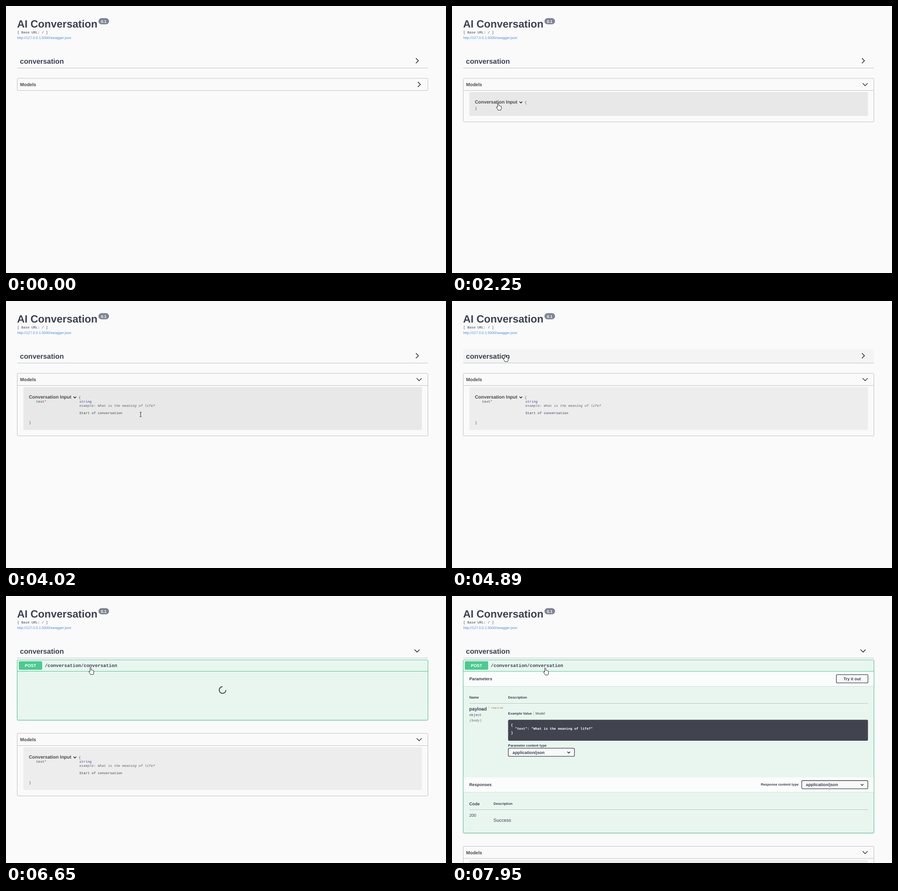
These frames come from a looping animation (961x583 px, 8 s). An HTML page:

```html
<!DOCTYPE html>
<html lang="en">
<head>
<meta charset="utf-8">
<title>API page</title>
<style>
html, body { margin: 0; width: 100%; height: 100%; overflow: hidden; background: #fafafa; }
svg { display: block; width: 961px; height: 583px; }
text { font-family: "Liberation Sans", Arial, sans-serif; fill: #3b4151; text-rendering: geometricPrecision; }
.b { font-weight: 700; }
.m { font-family: "Liberation Mono", "Courier New", monospace; }
.i { font-style: italic; fill: #666; }
.w { fill: #fff; }
.d { fill: #484a4d; }
.line { fill: none; stroke: #bfc1c5; }
.green { fill: none; stroke: #49cc90; }
.chev { fill: none; stroke: #111; stroke-width: 1.3; }
.box { fill: #f8f9f9; stroke: #41444e; stroke-width: 1.3; }
</style>
</head>
<body>
<svg id="stage" viewBox="0 0 961 583"></svg>
<script>
const $ = id => document.getElementById(id);
const text = (x, y, size, str, cls = '') =>
  `<text x="${x}" y="${y}" font-size="${size}" class="${cls}">${str}</text>`;
const mono = (x, y, str, cls = '') => text(x, y, 7.45, str, 'm ' + cls);
const rect = (x, y, w, h, attrs) => `<rect x="${x}" y="${y}" width="${w}" height="${h}" ${attrs}/>`;
const path = (d, cls, id = '') => `<path d="${d}" class="${cls}" id="${id}"/>`;
const group = (id, body) => `<g id="${id}">${body}</g>`;
const select = (x, y) => rect(x, y, 144.5, 17.8, 'rx="2.5" class="box"') +
  text(x + 9.3, y + 12.1, 9.2, 'application/json', 'b') +
  path(`M${x + 129} ${y + 7.6}l3 3 3-3`, 'chev');
const sectionBar = y => rect(25, y + 1, 896, 32, 'fill="#d3ded9"') +
  rect(25, y, 896, 32, 'fill="#fafdfb"');

const header =
  text(24.3, 47, 22.9, 'AI Conversation', 'b') +
  rect(202, 26.5, 23, 13.5, 'rx="6.7" fill="#7d8492"') +
  text(207.2, 36.8, 8.9, '0.1', 'b w') +
  mono(24.6, 59.6, '[ Base URL: / ]') +
  '<g fill="#4990e2">' + text(24.5, 71.5, 7.72, 'http://127.0.0.1:5000/swagger.json', 'link') + '</g>' +
  rect(24.5, 105, 897, 30.5, 'id="tagHover" fill="#f4f4f4"') +
  text(30.6, 126, 15.4, 'conversation', 'b') +
  path('M24.5 135.5H921.5', 'line') +
  path('', 'chev', 'tagChev');

const details =
  sectionBar(165) +
  text(37.7, 184.2, 9.2, 'Parameters', 'b') +
  rect(839.5, 171.7, 69, 18, 'rx="2" class="box"') +
  text(855, 184, 8.97, 'Try it out', 'b') +
  text(37.7, 224.4, 7.65, 'Name', 'b') +
  text(122.6, 224.4, 7.5, 'Description', 'b') +
  path('M38 234.5H908.5', 'line') +
  text(37.5, 250, 10.2, 'payload', 'b') +
  '<g id="req">' + text(78.6, 246.4, 5.5, '* required', 'm') + '</g>' +
  mono(37.8, 261.8, 'object') +
  mono(38, 273.5, '(body)', 'i') +
  text(122.6, 258.6, 7.4, 'Example Value', 'b') +
  path('M178.5 251.5V260.5', 'line') +
  text(182.2, 258.6, 7.6, 'Model') +
  rect(122.5, 270.3, 786, 45.7, 'rx="2.5" fill="#41444e"') +
  mono(128.8, 283.6, '{', 'b w') +
  mono(137.7, 292, '"text": "What is the meaning of life?"', 'b w') +
  mono(128.8, 300.8, '}', 'b w') +
  text(122.6, 328.5, 7.55, 'Parameter content type', 'b') +
  select(123, 332.4) +
  sectionBar(396) +
  text(37.7, 415.2, 9.2, 'Responses', 'b') +
  text(674.5, 414.3, 7.5, 'Response content type', 'b') +
  select(763.8, 403) +
  text(37.7, 456.8, 9.2, 'Code', 'b') +
  text(90.8, 456, 7.5, 'Description', 'b') +
  path('M38 466.5H908.5', 'line') +
  text(37.7, 482, 9.1, '200') +
  text(90.6, 493, 10.2, 'Success');

const operation =
  rect(24.5, 140.2, 897, 26, 'id="opShadow" rx="2.5" fill="none" stroke="#000" stroke-opacity=".1" stroke-width="2"') +
  rect(24.5, 139.5, 897, 26, 'id="opBox" rx="2.5" fill="#e8f6ef" stroke="#49cc90"') +
  group('loading', path('M473 198a7.3 7.3 0 1 0 7.3 7.3', 'spin')) +
  group('details', details) +
  path('M24.5 164.5H921.5', 'green', 'opLine') +
  rect(28, 142.5, 51, 18.5, 'rx="2" fill="#49cc90"') +
  text(41.3, 155.4, 8.97, 'POST', 'b w') +
  text(84.8, 155, 10.13, '/conversation/conversation', 'm b');

const models =
  rect(24.5, 158, 897, 26.5, 'id="modelsHover" rx="2.5" fill="#f4f4f4"') +
  rect(24.5, 158, 897, 26.5, 'id="modelsBox" rx="2.5" class="line"') +
  text(30.7, 175, 10.2, 'Models', 'b d') +
  path('', 'chev', 'modelsChev') +
  group('modelsBody',
    path('M24.5 184.5H921.5', 'line') +
    rect(38, 188, 870.5, 36, 'id="card" rx="2.5"') +
    text(50, 213, 10.18, 'Conversation Input', 'b d') +
    path('', 'chev', 'cardChev') +
    group('braces', mono(158.7, 213.4, '{') + mono(50.3, 225.8, '}', 'close')) +
    group('fields',
      mono(65.8, 221.8, 'text<tspan fill="#f00">*</tspan>') +
      mono(160.3, 221.8, '<tspan fill="#4747a3">string</tspan>') +
      mono(160.3, 230.8, 'example: What is the meaning of life?', 'i') +
      mono(160.3, 247.2, 'Start of conversation')));

const shapes = {
  hand: 'M-1.5 9V1.2Q-1.5 0-.3 0T1 1.2V5.5Q2.2 5 3.1 6 4.4 5.5 5.1 6.7 6.5 6.4 6.7 8V11Q6.7 13 5.6 15.4H-.5Q-1.5 13-3.8 10-4.4 8.5-3 8.3Z',
  beam: 'M-2-5Q0-5 0-4 0-5 2-5M0-4V4M-2 5Q0 5 0 4 0 5 2 5',
  arrow: 'M0 0V10.5L2.5 8.3 4 12 5.7 11.3 4.1 7.7H7.5Z'
};

$('stage').innerHTML = header + group('op', operation) + group('models', models) +
  '<circle id="click" r="7.5" fill="#f4f030" style="mix-blend-mode:multiply"/>' +
  '<path id="cursor" stroke="#111" stroke-width=".9" stroke-linejoin="round"/>';
document.querySelector('.link').style.fill = '#4990e2';
document.querySelector('#req text').style.fill = '#c0602c';
document.querySelector('.spin').setAttribute('style', 'fill:none;stroke:#555;stroke-width:2.2');

// Pointer stops: time, x, y
const stops = [
  [80, 330, 583], [480, 215, 330], [870, 118, 100], [990, 96, 56], [1390, 53, 173],
  [1740, 53, 173], [2060, 101, 212], [2620, 101, 212], [3000, 223, 232.5],
  [3240, 223, 232.5], [3610, 261, 256], [3850, 261, 256], [4110, 309, 244],
  [4390, 225, 170], [4660, 122, 116], [4890, 116, 117], [5730, 116, 117],
  [6060, 185, 156], [7800, 185, 156], [7950, 204, 157]
];
const clicks = [1460, 2110, 5130, 6520];

function pointer(t) {
  const n = stops.findIndex(s => s[0] > t);
  if (n < 0) return stops.at(-1).slice(1);
  const [t0, x0, y0] = stops[n - 1], [t1, x1, y1] = stops[n];
  const u = (t - t0) / (t1 - t0), k = u * u * (3 - 2 * u);
  const e = (u + k) / 2;
  return [x0 + (x1 - x0) * e, y0 + (y1 - y0) * e];
}

const show = (id, on) => $(id).style.display = on ? '' : 'none';
const set = (id, name, value) => $(id).setAttribute(name, value);

function draw(t) {
  const modelsOpen = t >= 1600, braces = t >= 2250, fields = t >= 2300;
  const tagOpen = t >= 5210, loading = t >= 6620 && t < 6700, full = t >= 6700;

  const opHeight = full ? 378 : loading ? 131.5 : 25.5;
  const shift = !tagOpen ? 0 : full ? 388.5 : loading ? 142 : 36;
  const cardHeight = fields ? 93.5 : braces ? 52 : 36;

  show('op', tagOpen);
  show('loading', loading);
  show('details', full);
  show('opLine', loading || full);
  set('opBox', 'height', opHeight);
  set('opShadow', 'height', opHeight);
  set('tagChev', 'd', tagOpen ? 'M892.3 117l5.5 5.5 5.5-5.5' : 'M895.3 114l5.5 5.5-5.5 5.5');

  set('models', 'transform', `translate(0 ${shift})`);
  show('modelsBody', modelsOpen);
  show('braces', braces);
  show('fields', fields);
  set('modelsBox', 'height', modelsOpen ? cardHeight + 43 - (braces ? 0 : .5) - .0 : 26.5);
  set('card', 'height', cardHeight);
  set('modelsChev', 'd', modelsOpen ? 'M896.8 168.6l5.5 5.5 5.5-5.5' : 'M899.6 165.7l5.5 5.5-5.5 5.5');
  set('cardChev', 'd', braces ? 'M147.4 208.8l3 3 3-3' : 'M149 207.3l3 3-3 3');
  document.querySelector('.close').setAttribute('y', fields ? 267.6 : 225.8);

  const visible = t >= 80;
  show('cursor', visible);
  const [x, y] = visible ? pointer(t) : [0, -99];
  const inRow = (top, bottom) => x > 24 && x < 922 && y >= top && y < bottom;
  const onTag = inRow(105, 135);
  const onModels = inRow(158 + shift, 184.5 + shift);
  const onCard = modelsOpen && inRow(188 + shift, 188 + shift + cardHeight);
  const onOp = tagOpen && inRow(139, 165);
  const onName = onCard && x < 157 && y < 222 + shift;
  show('tagHover', onTag);
  show('modelsHover', onModels && !modelsOpen);
  set('card', 'fill', onCard ? '#e8e8e8' : '#ededed');

  const kind = onTag || onModels || onOp || onName ? 'hand' : onCard ? 'beam' : 'arrow';
  set('cursor', 'd', shapes[kind]);
  set('cursor', 'fill', kind === 'beam' ? 'none' : '#fff');
  set('cursor', 'transform', `translate(${x} ${y})`);

  show('click', clicks.some(c => t >= c && t < c + 100));
  set('click', 'transform', `translate(${x - .5} ${y + 1})`);
}

let start;
function frame(now) {
  start ??= now;
  draw((now - start) % 8000);
  requestAnimationFrame(frame);
}
draw(0);
requestAnimationFrame(frame);
</script>
</body>
</html>
```
